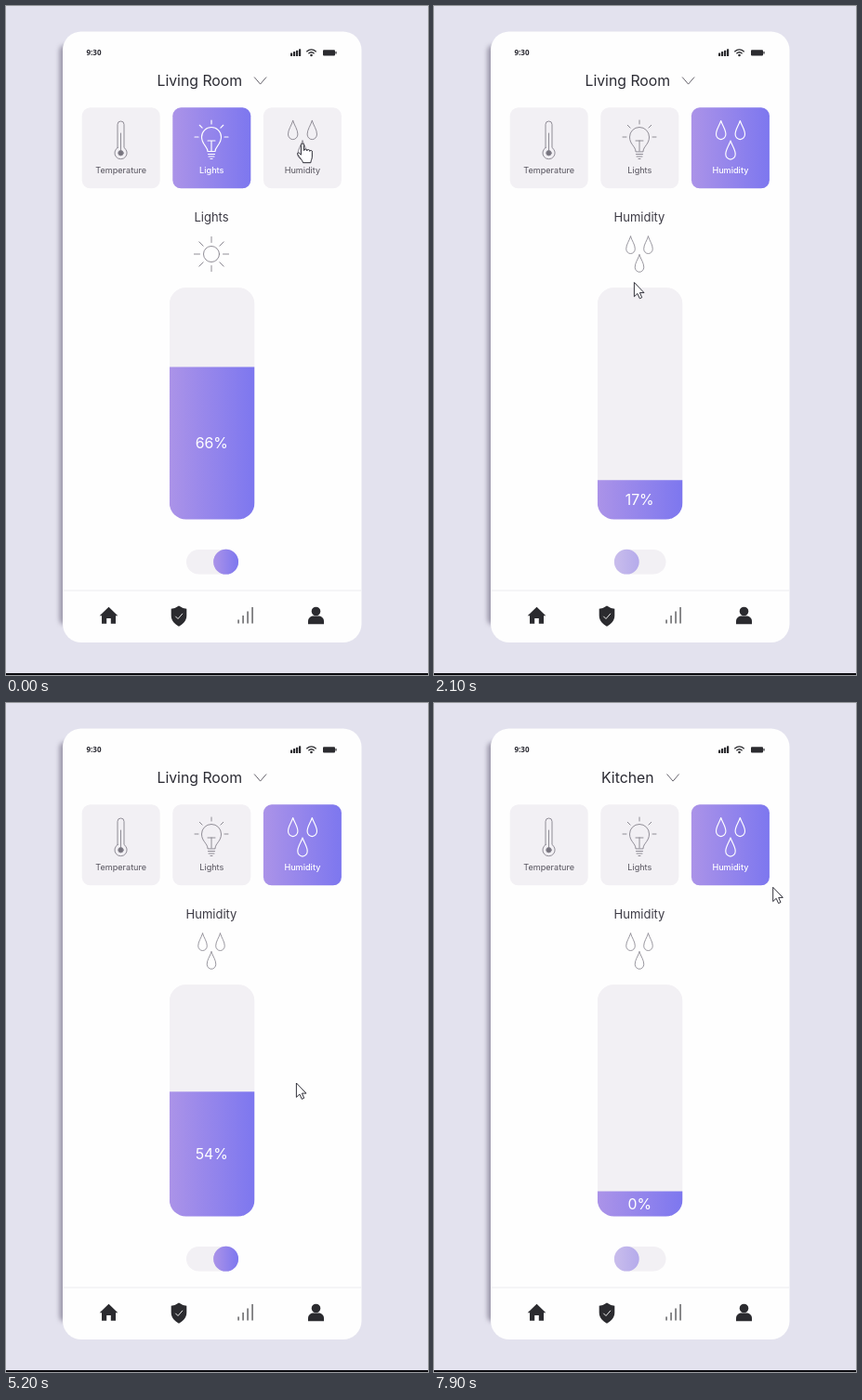
These frames come from a looping animation (454x720 px, 8000 ms). An HTML page:

```html
<!DOCTYPE html>
<html lang="en">
<head>
<meta charset="utf-8">
<title>Smart home panel</title>
<style>
  html, body { margin: 0; width: 100%; height: 100%; overflow: hidden; background: #e3e2ee; }
  svg { display: block; width: 100vw; height: 100vh; }
  text { font-family: Inter, sans-serif; fill: #2b2b33; }
  .icon { fill: none; stroke: #85828c; stroke-width: .9; stroke-linecap: round; stroke-linejoin: round; }
  .name { fill: #55525c; }
  .section { fill: #3d3b45; }
  .room { font-weight: 300; }
  .on .icon { stroke: #fff; stroke-width: 1.15; }
  .on text { fill: #fff; font-weight: 500; }
  .solid { fill: #2b2b2f; }
  #percent { fill: #fff; }
</style>
</head>
<body>
<svg id="stage" viewBox="0 0 454 720"></svg>
<script>
const LOOP = 8000, STEP = 100;
const ROOMS = ['All Rooms', 'Living Room', 'Bedroom', 'Kitchen', 'Bathroom', 'Studio', 'Washing'];
const ROW = 20.2, MENU_TOP = 110.4;
const BAR = { x: 175.8, y: 303, w: 91.7, h: 249.5 };

const label = (x, y, size, text, attrs = '') =>
  `<text x="${x}" y="${y}" font-size="${size}" text-anchor="middle" ${attrs}>${text}</text>`;
const repeat = (count, draw) => Array.from({ length: count }, (_, i) => draw(i)).join('');

const drop = (x, y, s) =>
  `<path transform="translate(${x} ${y}) scale(${s})" d="M0 0C1.5 5 5.2 9.5 5.2 14.5A5.2 5.6 0 0 1-5.2 14.5C-5.2 9.5-1.5 5 0 0Z"/>`;

const drops = (x, y, s) => `<g class="icon">
  ${repeat(3, i => drop(x + (i - 1) * 10.3 * s, y + (i % 2) * 21.5 * s, s))}</g>`;

// Rays every 45 degrees, clockwise from the left.
const rays = (x, y, inner, outer, count) => repeat(count, i =>
  `<path d="M${-inner} 0H${-outer}" transform="translate(${x} ${y}) rotate(${i * 45})"/>`);

const thermometer = `<g class="icon">
  <path d="M120 152.5V127.5a3.5 3.5 0 0 1 7 0V152.5a6.6 6.6 0 1 1-7 0ZM123.5 137V156"/>
  <circle cx="123.5" cy="158.2" r="2.7" fill="#77747e"/></g>`;

const bulb = `<g class="icon">
  <path d="M217 156.5C217 151 210.5 149 210.5 141a10.5 10.5 0 0 1 21 0C231.5 149 225 151 225 156.5Z"/>
  <path d="M217 145H225M221 145V156M217.5 159.5H224.5M218 162H224M220 164.5H222"/>
  ${rays(221, 141, 14, 18, 5)}</g>`;

const sun = `<g class="icon"><circle cx="221" cy="267" r="8.5"/>${rays(221, 267, 12.5, 18.6, 8)}</g>`;

const TABS = [['Temperature', thermometer], ['Lights', bulb], ['Humidity', drops(319, 123.5, 1)]];
const tab = (i, fill, attrs = '') => {
  const x = 81.7 + 97.6 * i, [name, icon] = TABS[i];
  return `<g ${attrs}><rect x="${x}" y="109.3" width="84" height="87" rx="9" fill="${fill}"/>
    ${icon}${label(x + 42, 180.3, 9.1, name, 'class="name"')}</g>`;
};

const statusBar = `
  <text x="86.5" y="53" font-size="8" font-weight="700" style="font-family:'Open Sans',sans-serif">9:30</text>
  <g class="solid">
    ${repeat(4, i => `<rect x="${306 + i * 3}" y="${50.5 - i * 1.4}" width="2.2" height="${3.5 + i * 1.4}" rx=".5"/>`)}
    <rect x="341" y="47.2" width="13" height="6.2" rx="1"/><rect x="354.4" y="49" width="1.2" height="2.6"/>
    <circle cx="328.5" cy="53" r="1.3"/>
  </g>
  <path d="M323.3 49.2q5.2-4.6 10.4 0M325.4 51.2q3.1-2.8 6.2 0" fill="none" stroke="#2b2b2f" stroke-width="1.3"/>`;

const navBar = `
  <path d="M61 629H382" stroke="#ececf0"/>
  <g class="solid">
    <path d="M110.5 646.8L120.3 656.2H118V664.8H112.8V659H108.2V664.8H103V656.2H100.7Z"/>
    <path d="M186 645.6Q190 648.6 194.3 648.8V656C194.3 662 190 665.5 186 667.7C182 665.5 177.7 662 177.7 656V648.8Q182 648.6 186 645.6Z"/>
    ${repeat(4, i => `<rect x="${249.5 + i * 5}" y="${660.5 - i * 4.5}" width="1.1" height="${4 + i * 4.5}"/>`)}
    <circle cx="333.5" cy="651.5" r="4.8"/>
    <path d="M325 665.3V662C325 658.5 328 656.5 331 656.5H336C339 656.5 342 658.5 342 662V665.3Z"/>
  </g>
  <path d="M182.3 656.8L185 659.5L190 653.8" fill="none" stroke="#fff" stroke-width=".9"/>`;

const menu = `<g id="menu"><rect x="157.5" y="96" width="129.5" height="147" fill="#fefefe"/>
  ${repeat(ROOMS.length, i => `<text class="room" x="162.6" y="${MENU_TOP + 5.8 + i * ROW}" font-size="15.7">${ROOMS[i]}</text>`)}</g>`;

const cursor = `<g id="cursor" fill="#fff" stroke="#1c1c26" stroke-linejoin="round">
  <path id="arrow" d="M.4 .5V15.8L3.9 12.5L6.3 17.8L8.7 16.7L6.4 11.6H11Z" stroke-width=".9"/>
  <path id="hand" transform="scale(.94)" d="M-1.7 13V1.7a1.7 1.7 0 0 1 3.4 0V8a1.7 1.7 0 0 1 3.4 .3a1.6 1.6 0 0 1 3.2 .6a1.4 1.4 0 0 1 2.7 .8V15C11 18 9.6 19 9.4 22H.6C0 19-3 17-5.5 12.6C-6.5 10.6-4.4 9.8-3.3 11.2Z"/></g>`;

stage.innerHTML = `
  <defs>
    <linearGradient id="violet"><stop stop-color="#ab93e8"/><stop offset="1" stop-color="#7d77ef"/></linearGradient>
    <linearGradient id="pale"><stop stop-color="#c9bdec"/><stop offset="1" stop-color="#b5abeb"/></linearGradient>
    <filter id="blur" x="-200%" width="500%"><feGaussianBlur stdDeviation="2.8"/></filter>
    <clipPath id="barClip"><rect x="${BAR.x}" y="${BAR.y}" width="${BAR.w}" height="${BAR.h}" rx="18"/></clipPath>
  </defs>
  <rect width="454" height="720" fill="#e3e2ee"/>
  <rect y="718" width="454" height="2" fill="#0c0c10"/>
  <rect x="57.5" y="42" width="14" height="624" rx="6" fill="#5d566e" opacity=".55" filter="url(#blur)"/>
  <rect x="61" y="27.5" width="321.5" height="657.5" rx="20" fill="#fefefe"/>
  ${statusBar}${navBar}
  ${label(208.3, 85.5, 15.8, 'Living Room', 'id="living"')}
  ${label(208.3, 85.5, 15.8, 'Kitchen', 'id="kitchen"')}
  <path id="chevron" d="M-6.5-3.8L0 3.8L6.5-3.8" fill="none" stroke="#55525c" stroke-width=".9"/>
  ${repeat(3, i => tab(i, '#f2f0f4'))}
  ${tab(1, 'url(#violet)', 'class="on" id="lightsTab"')}
  ${tab(2, 'url(#violet)', 'class="on" id="humidityTab"')}
  <g id="lights">${label(221, 231.7, 13, 'Lights', 'class="section"')}${sun}</g>
  <g id="humidity">${label(221, 231.7, 13, 'Humidity', 'class="section"')}${drops(221, 248, .92)}</g>
  <g clip-path="url(#barClip)">
    <rect x="${BAR.x}" y="${BAR.y}" width="${BAR.w}" height="${BAR.h}" fill="#f2f0f4"/>
    <rect id="fill" x="${BAR.x}" width="${BAR.w}" height="${BAR.h}" fill="url(#violet)"/>
  </g>
  ${label(221.2, 0, 15.8, '', 'id="percent"')}
  <rect x="194" y="585" width="55.5" height="26.5" rx="13.25" fill="#f2f0f4"/>
  <g id="knob"><circle r="13.4" fill="url(#pale)"/><circle id="knobOn" r="13.4" fill="url(#violet)"/></g>
  ${menu}${cursor}`;

const ui = Object.fromEntries([...stage.querySelectorAll('[id]')].map(e => [e.id, e]));
const rooms = stage.querySelectorAll('.room');
const set = (id, name, value) => ui[id].setAttribute(name, value);
const fade = (id, value) => set(id, 'opacity', value);

const ramp = (t, start, duration = 400) => Math.min(1, Math.max(0, (t - start) / duration));
const ease = (t, start, duration) => { const k = ramp(t, start, duration); return k * k * (3 - 2 * k); };

const HOME = { x: 319, y: 148 };
const MOVES = [
  { start: 700, time: 600, x: 264, y: 527.5 },    // to the bar's foot
  { start: 1500, time: 600, x: 215, y: 297 },     // above the bar
  { start: 2300, time: 600, x: 218.5, y: 426 },   // grab the level
  { start: 3100, time: 600, x: 218.5, y: 332 },   // drag it up
  { start: 3900, time: 500, x: 208, y: 594 },     // toggle
  { start: 4800, time: 400, x: 312, y: 408.5 },
  { start: 5200, time: 500, x: 238, y: 82 },      // room title
  { start: 6000, time: 500, x: 229.5, y: 163.5 }, // Kitchen
  { start: 7400, time: 500, x: 364.3, y: 197.8 },
];
const pointerAt = t => MOVES.reduce((p, m) => {
  const k = ramp(t, m.start, m.time);
  return { x: p.x + (m.x - p.x) * k, y: p.y + (m.y - p.y) * k };
}, HOME);

// Half sizes around the centre of each clickable area: title, tabs, bar, toggle.
const ZONES = [
  { x: 221, y: 80, w: 62, h: 12 }, { x: 221, y: 153, w: 140, h: 43 },
  { x: 221, y: 428, w: 41, h: 120 }, { x: 221, y: 598, w: 27, h: 13 },
];
const clickable = p => ZONES.some(z => Math.abs(p.x - z.x) < z.w && Math.abs(p.y - z.y) < z.h);

function render(t) {
  const humid = ease(t, 600), changed = ease(t, 7300, 300);
  const open = ease(t, 5900) - changed;
  fade('lights', 1 - humid);
  fade('lightsTab', 1 - humid);
  fade('humidity', humid);
  fade('humidityTab', humid);
  fade('living', 1 - changed);
  fade('kitchen', changed);
  set('chevron', 'transform', `translate(${273.6 - 16.5 * changed + 1.3 * open} 80.3) rotate(${90 * open})`);
  fade('menu', open);

  const level = 66 * (1 - ramp(t, 600)) + 17 * ramp(t, 1500, 300) + 37 * ramp(t, 3100, 600) - 54 * ramp(t, 7300);
  const height = Math.max(27, 2.485 * level), bottom = BAR.y + BAR.h;
  set('fill', 'y', bottom - height);
  set('percent', 'y', bottom - height / 2 + 5.8);
  ui.percent.textContent = Math.round(level) + '%';

  const on = 1 - humid + ease(t, 4800, 300) - ease(t, 7300);
  set('knob', 'transform', `translate(${207.3 + 29.3 * on} 598.2)`);
  fade('knobOn', on);

  // The highlight trails the pointer slightly.
  const hovered = Math.round((pointerAt(t - 100).y - MENU_TOP) / ROW);
  rooms.forEach((room, i) => room.style.fill = i === 1 || i === hovered ? '#a191e8' : '');

  const pointer = pointerAt(t), hand = clickable(pointer);
  fade('hand', hand ? 1 : 0);
  fade('arrow', hand ? 0 : 1);
  set('cursor', 'transform', `translate(${pointer.x} ${pointer.y})`);
}

const start = performance.now();
function tick() {
  const t = (performance.now() - start) % LOOP;
  render(Math.floor(t / STEP) * STEP);
  requestAnimationFrame(tick);
}
tick();
</script>
</body>
</html>
```
